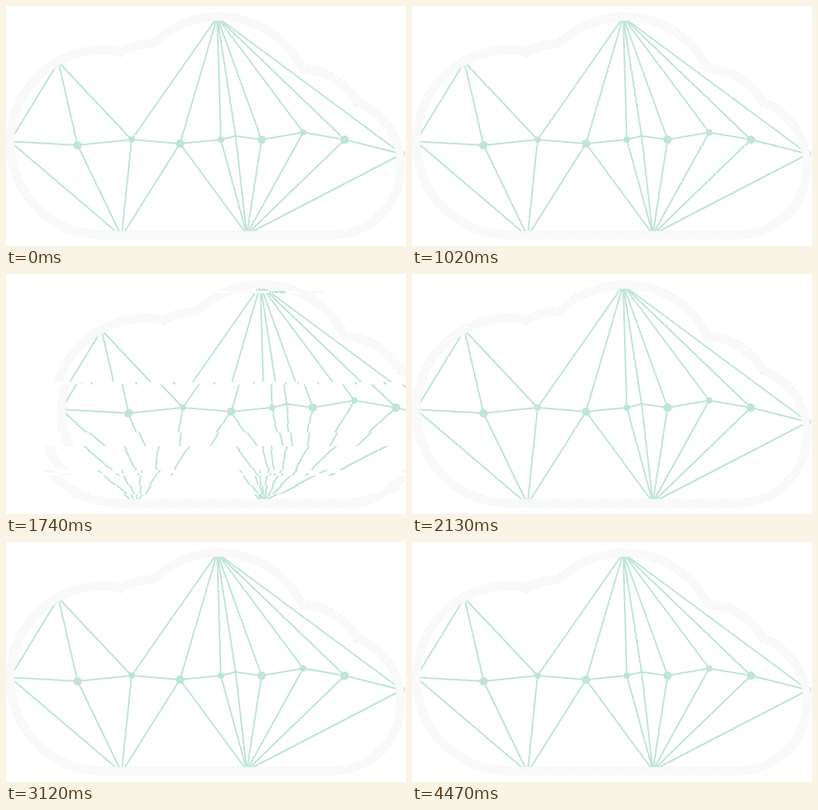
An HTML page with a canvas that plays this animation: 500 by 300 pixels, repeating every 4500 ms.

```html
<!DOCTYPE html>
<html lang="en">
<head>
<meta charset="utf-8">
<title>Cloud network</title>
<style>
  html, body { margin: 0; width: 100%; height: 100%; overflow: hidden; background: #fff; }
  canvas { display: block; }
</style>
</head>
<body>
<canvas id="stage" width="500" height="300"></canvas>
<script>
const W = 500, H = 300, LOOP = 4500, STEP = 30;
const GREEN = '#bfe4da', GREY = '#f9f9f9';
const out = document.getElementById('stage').getContext('2d');
const art = document.createElement('canvas');
art.width = W;
art.height = H;

const chain = [
  [5, 169.2], [89.5, 174], [157, 167], [217.5, 172], [268.5, 167],
  [287, 162.5], [319.5, 167], [371.5, 158], [423.5, 167], [495, 185]
];

// Large and small dots alternate; every fifth one is tiny.
function dotRadius(i) {
  const k = i % 5;
  return k === 0 ? 2 : k % 2 ? 5.3 : 4;
}

function drawArt() {
  const c = art.getContext('2d');
  const fan = (x, y, from, to) => {
    for (const point of chain.slice(from, to + 1)) {
      c.moveTo(x, y);
      c.lineTo(...point);
    }
  };
  c.strokeStyle = c.fillStyle = GREEN;
  c.lineWidth = 2;
  c.beginPath();
  chain.forEach(point => c.lineTo(...point));
  fan(65.5, 70, 0, 2);
  fan(264, 14, 2, 9);
  fan(144.5, 288, 0, 3);
  fan(301, 285.5, 3, 9);
  c.stroke();
  chain.forEach(([x, y], i) => {
    c.beginPath();
    c.arc(x, y, dotRadius(i), 0, 7);
    c.fill();
  });

  const cloud = new Path2D(`M121 286.2 A115.6 115.6 0 0 1 121 55
    Q132 55 143 57.5 Q162 48 185 46.5 A115 115 0 0 1 264 13.5
    A115 115 0 0 1 370 78.5 Q411 79 440 120.5
    A86 86 0 0 1 409 286.2 Z`);
  // Fine green specks along both edges of the cloud
  c.lineWidth = 11;
  c.setLineDash([1, 5]);
  c.stroke(cloud);
  c.setLineDash([]);
  c.strokeStyle = GREY;
  c.lineWidth = 10;
  c.stroke(cloud);
}

function noise(a, b) {
  const v = Math.sin(a * 127.1 + b * 311.7) * 43758.5453;
  return v - Math.floor(v);
}

// Three evenly spaced bursts, each four times as strong as the one before
function glitch(t) {
  const start = 540, gap = 480, count = 3;
  const i = Math.floor((t - start) / gap);
  if (i < 0 || i >= count) return 0;
  const away = Math.abs((t - start) % gap - gap / 2);
  return 4 ** (i + 1 - count) * Math.max(0, 1 - away / 120);
}

// The upper part slides as one, the middle furthest, the foot in falling steps.
function slide(y) {
  if (y < 135) return 54;
  return Math.max(20, 64 - 26 * Math.max(0, Math.ceil((y - 214) / 30)));
}

function rowShift(y, step, amount) {
  const n = noise(y, step);
  if (!amount) return n < .01 ? -1 : n > .99 ? 1 : 0;
  const strip = y % 114 > 20 && y % 114 < 24 ? 18 : 0;
  const tear = (noise(Math.floor(y / 11), step) - .5) * (y > 175 ? 5 : 1);
  return Math.round(amount * (slide(y) + strip + tear));
}

function frame() {
  const step = Math.floor(performance.now() % LOOP / STEP);
  const amount = glitch(step * STEP);
  out.fillStyle = '#fff';
  out.fillRect(0, 0, W, H);
  for (let y = 0; y < H; y++) {
    out.drawImage(art, 0, y, W, 1, rowShift(y, step, amount), y, W, 1);
  }
  requestAnimationFrame(frame);
}

drawArt();
frame();
</script>
</body>
</html>
```
